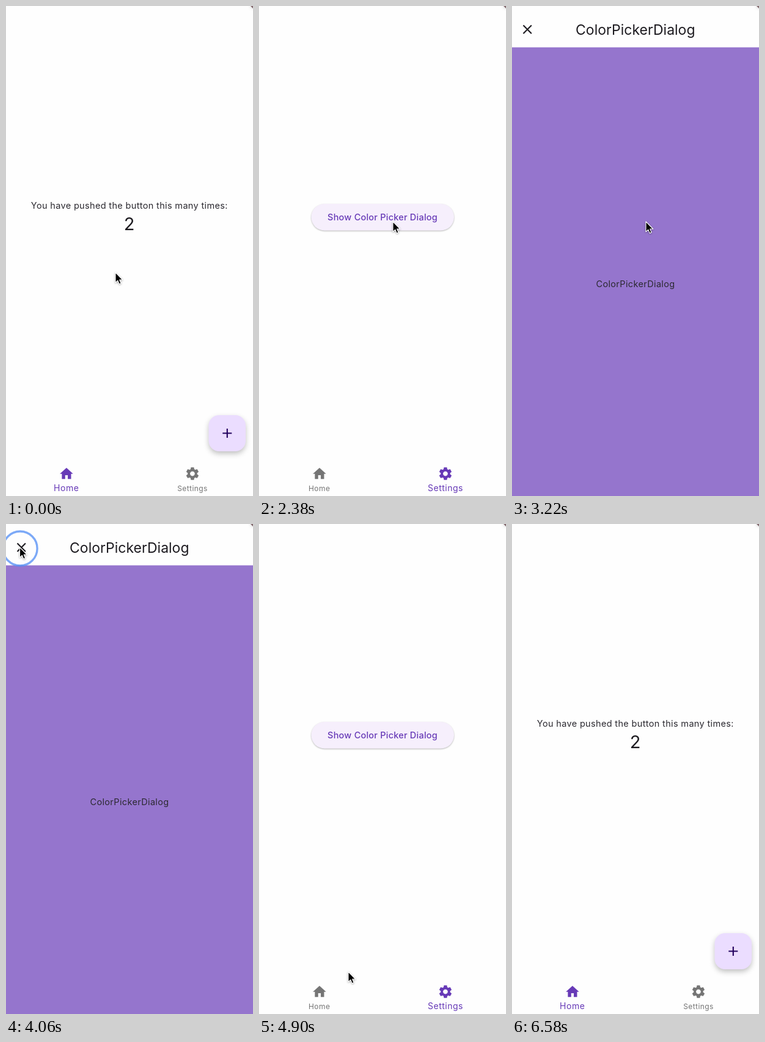
An HTML page for the animation above (7 s loop, 404 by 800 pixels).

```html
<!DOCTYPE html>
<html lang="en">
<head>
<meta charset="utf-8">
<title>Tabs and dialog</title>
<style>
  html, body { margin: 0; width: 100%; height: 100%; overflow: hidden; background: #fefefe; }
  svg { display: block; width: 404px; height: 800px; }
  text { font-family: Inter, Roboto, sans-serif; fill: #1d1b20; text-anchor: middle; }
  .body { font-size: 14.5px; letter-spacing: .34px; fill: #2b2930; }
  .count { font-size: 29px; }
  .title { font-size: 23px; }
  .action { font-size: 14.5px; font-weight: 500; letter-spacing: .22px; fill: #673ab7; }
  .tab text { font-size: 14px; letter-spacing: .5px; fill: inherit; }
  .fab { filter: drop-shadow(0 4px 4.5px rgba(0, 0, 0, .24)); }
  .button { filter: drop-shadow(0 1.5px 1.2px rgba(0, 0, 0, .28)); }
  .cursor { filter: drop-shadow(0 1.5px 1.5px rgba(0, 0, 0, .35)); }
  .corner { filter: drop-shadow(0 0 2.5px rgba(0, 0, 0, .5)); }
</style>
</head>
<body>
<svg viewBox="0 0 404 800">
  <defs>
    <clipPath id="bar"><rect y="743" width="404" height="57"/></clipPath>
  </defs>
  <rect width="404" height="800" fill="#fefefe"/>

  <g id="home">
    <text class="body" x="201.8" y="331.4">You have pushed the button this many times:</text>
    <text class="count" x="201.7" y="366.3">2</text>
    <rect class="fab" x="331.5" y="668" width="60.5" height="59" rx="17" fill="#ebddff"/>
    <path d="M354.3 697.5h15M361.8 690v15" stroke="#21005d" stroke-width="2.1"/>
  </g>

  <g id="settings">
    <rect class="button" x="85.5" y="323" width="233.5" height="43.5" rx="21.75" fill="#f6effc"/>
    <text class="action" x="202" y="350.3">Show Color Picker Dialog</text>
  </g>

  <g clip-path="url(#bar)"><circle id="ripple" cy="771" fill="#2a1a2a"/></g>

  <g class="tab" id="homeTab">
    <path transform="translate(86 750.8) scale(1.077)" d="M10 20v-6h4v6h5v-8h3L12 3 2 12h3v8z"/>
    <text>Home</text>
  </g>
  <g class="tab" id="settingsTab">
    <path transform="translate(292 750.6) scale(1.077)" d="M19.14 12.94c.04-.3.06-.61.06-.94 0-.32-.02-.64-.07-.94l2.03-1.58c.18-.14.23-.41.12-.61l-1.92-3.32c-.12-.22-.37-.29-.59-.22l-2.39.96c-.5-.38-1.03-.7-1.62-.94l-.36-2.54c-.04-.24-.24-.41-.48-.41h-3.84c-.24 0-.43.17-.47.41l-.36 2.54c-.59.24-1.13.57-1.62.94l-2.39-.96c-.22-.08-.47 0-.59.22L2.74 8.87c-.12.21-.08.47.12.61l2.03 1.58c-.05.3-.09.63-.09.94s.02.64.07.94l-2.03 1.58c-.18.14-.23.41-.12.61l1.92 3.32c.12.22.37.29.59.22l2.39-.96c.5.38 1.03.7 1.62.94l.36 2.54c.05.24.24.41.48.41h3.84c.24 0 .44-.17.47-.41l.36-2.54c.59-.24 1.13-.56 1.62-.94l2.39.96c.22.08.47 0 .59-.22l1.92-3.32c.12-.22.07-.47-.12-.61l-2.01-1.58zM12 15.6c-1.98 0-3.6-1.62-3.6-3.6s1.62-3.6 3.6-3.6 3.6 1.62 3.6 3.6-1.62 3.6-3.6 3.6z"/>
    <text>Settings</text>
  </g>

  <g id="dialog">
    <rect width="404" height="67.5" fill="#fefefe"/>
    <rect y="67.5" width="404" height="800" fill="#9575cd"/>
    <path d="M18.5 31.5l13.4 13.4M31.9 31.5l-13.4 13.4" stroke="#1d1b20" stroke-width="2.1"/>
    <text class="title" x="201.8" y="46.9">ColorPickerDialog</text>
    <text class="body" x="202" y="459.2">ColorPickerDialog</text>
  </g>

  <path class="corner" d="M400 0h4v4z" fill="#80666b"/>
  <circle id="ring" fill="none" stroke="#508cf5"/>
  <path id="cursor" class="cursor" d="M0 0V16.6L3.8 13.1 6.3 18.9 9.1 17.7 6.7 12H11.8Z" stroke="#fff" stroke-width="1.1" stroke-linejoin="round"/>
</svg>
<script>
const LOOP = 7000, STEP = 70;
const TO_SETTINGS = 1260, TO_HOME = 5250, OPEN = 2590, CLOSE = 4060, SLIDE = 290;
const presses = [1120, 2450, 3920, 5110];
const taps = [[1120, 306], [5110, 99]];
// time, x, y of the pointer tip
const path = [
  [70, 179, 435], [700, 305, 757], [1820, 305, 757], [2310, 219, 352],
  [3360, 219, 352], [3780, 22.5, 38], [4410, 22.5, 38], [4900, 146, 731],
  [5040, 99, 757], [5600, 99, 757], [6300, 250, -30]
];

const $ = id => document.getElementById(id);
const clamp = v => Math.max(0, Math.min(1, v));
const mix = (a, b, k) => a + (b - a) * k;
const smooth = k => k * k * (3 - 2 * k);
const show = (el, on) => el.style.display = on ? '' : 'none';
const set = (el, attrs) => { for (const k in attrs) el.setAttribute(k, attrs[k]); };

// cubic-bezier(.35, .91, .33, .97)
function slideEase(x) {
  if (x <= 0 || x >= 1) return clamp(x);
  const bez = (s, a, b) => 3 * (1 - s) ** 2 * s * a + 3 * (1 - s) * s * s * b + s ** 3;
  let lo = 0, hi = 1;
  for (let i = 0; i < 24; i++) {
    const mid = (lo + hi) / 2;
    if (bez(mid, .35, .33) < x) lo = mid; else hi = mid;
  }
  return bez(lo, .91, .97);
}

function pointer(t) {
  if (t <= path[0][0]) return path[0].slice(1);
  const i = path.findIndex(p => p[0] > t);
  if (i < 0) return path[path.length - 1].slice(1);
  const [t0, x0, y0] = path[i - 1], [t1, x1, y1] = path[i];
  const k = smooth((t - t0) / (t1 - t0));
  return [mix(x0, x1, k), mix(y0, y1, k)];
}

function drawTab(id, x, k) {
  const tab = $(id);
  const rgb = [[117, 103], [117, 58], [117, 183]].map(([a, b]) => Math.round(mix(a, b, k)));
  tab.setAttribute('fill', `rgb(${rgb})`);
  tab.querySelector('text').setAttribute('transform',
    `translate(${x} ${mix(792.4, 791.8, k)}) scale(${mix(12 / 14, 1, k)})`);
}

function drawRing(t, x, y) {
  const age = t - presses.findLast(p => p <= t);
  const on = age >= 0 && age < 300;
  show($('ring'), on);
  if (on) set($('ring'), {
    cx: x + .6, cy: y + 2, r: 18 + age / 14,
    'stroke-width': age < 210 ? 4 - age / 210 : 3 - (age - 210) / 45,
    'stroke-opacity': .75
  });
}

function drawRipple(t) {
  const tap = taps.find(([s]) => t >= s && t < s + 490);
  show($('ripple'), tap);
  if (!tap) return;
  const age = t - tap[0];
  set($('ripple'), {
    cx: tap[1],
    r: mix(20, 105, 1 - (1 - clamp(age / 400)) ** 2),
    'fill-opacity': .11 * clamp(age / 100) * clamp((490 - age) / 260)
  });
}

function draw(t) {
  const onSettings = t >= TO_SETTINGS && t < TO_HOME;
  show($('home'), !onSettings);
  show($('settings'), onSettings);

  const k = clamp((t - TO_SETTINGS) / 140) - clamp((t - TO_HOME) / 140);
  drawTab('homeTab', 98.7, 1 - k);
  drawTab('settingsTab', 305, k);
  drawRipple(t);

  const up = slideEase((t - OPEN) / SLIDE) - slideEase((t - CLOSE) / SLIDE);
  show($('dialog'), up > 0);
  $('dialog').setAttribute('transform', `translate(0 ${800 * (1 - up)})`);

  const [x, y] = pointer(t);
  drawRing(t, x, y);
  $('cursor').setAttribute('transform', `translate(${x} ${y})`);
}

const start = performance.now();
function tick(now) {
  const t = Math.max(0, now - start) % LOOP;
  draw(Math.min(6580, Math.floor(t / STEP) * STEP));
  requestAnimationFrame(tick);
}
draw(0);
requestAnimationFrame(tick);
</script>
</body>
</html>
```
